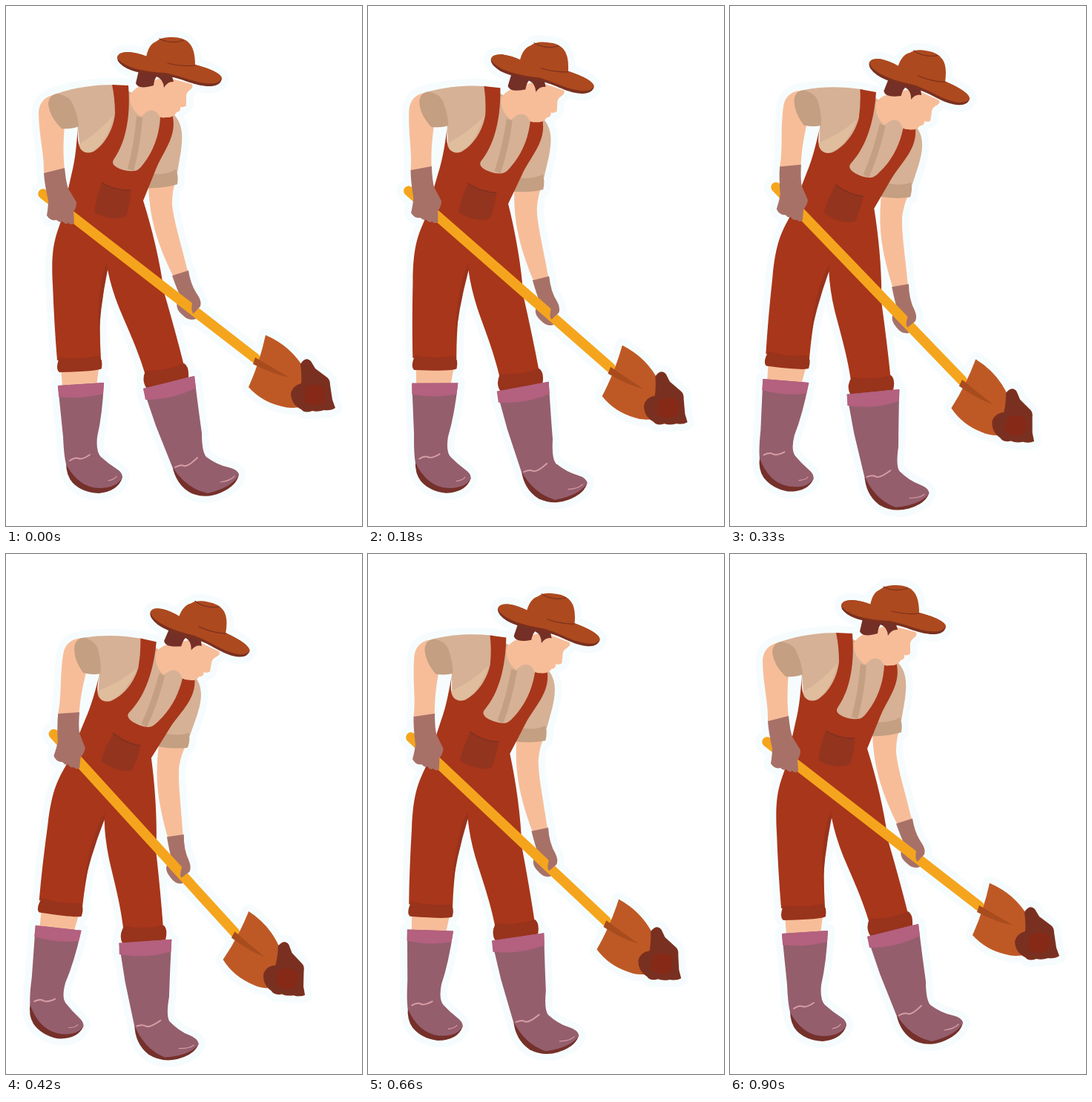
An HTML page that plays this animation: 480x700 px, repeating every 930 ms.

```html
<!DOCTYPE html>
<html lang="en">
<head>
<meta charset="utf-8">
<title>Digging gardener</title>
<style>
  html, body { margin: 0; width: 100%; height: 100%; overflow: hidden; background: #fff; }
  svg { display: block; width: 480px; height: 700px; }
</style>
</head>
<body>
<svg viewBox="0 0 480 700"><g id="man" stroke-linejoin="round" stroke-linecap="round"></g></svg>
<script>
const SKIN = '#f7bd99', SHIRT = '#d6b196', SHADE = '#c49f82', CLOTH = '#a8361a', CUFF = '#98331c',
      GLOVE = '#a77168', BOOT = '#945e6d', BAND = '#b4607f', SOLE = '#75302a', SHINE = '#d79ca4',
      HAT = '#ad491e', DARK = '#7a3020', HALO = '#f6fcfd';

// [colour, path, line width]; shapes without a width are filled
const parts = [
  // right arm and shirt
  [SKIN, 'M192 243C194 285 202 315 225 363L245 357C236 320 225 285 224 266Q224 250 228 238Z'],
  [SHIRT, 'M68 118C95 109 120 106 146 106L168 116L225 145C240 158 238 180 236 195L231 224L192 235L150 230L100 195L97 165C92 140 85 125 68 118Z'],
  ['#dfbd9d', 'M98 186Q125 170 145 147Q135 190 110 199Q100 197 98 186Z'],
  [SHADE, 'M176 148L184 150Q181 190 172 222L164 219Q173 185 176 148Z'],
  [SHADE, 'M196 226Q215 228 229 220Q233 228 231 240Q212 246 189 245Q191 235 196 226Z'],
  // left arm
  [SKIN, 'M62 120C50 124 44 132 44 145C45 180 52 200 51 226L79 221C77 200 77 185 79 160Z'],
  [SHADE, 'M57 131Q58 120 68 118C80 120 88 124 91 135Q97 148 98 162Q88 166 75 165C66 156 58 145 57 131Z'],
  // legs and overalls
  [SKIN, 'M74 488H125L122 512H76Z'],
  [CLOTH, 'M143 106L165 107C168 145 163 182 145 207C142 212 146 216 153 219Q164 223 172 222C180 222 184 214 190 206C202 188 207 168 208 150L224 145C232 175 212 195 202 220Q192 245 185 262C197 300 208 345 213 385Q229 440 240 484L188 497C178 462 160 425 152 405Q142 380 137 355C131 370 133 385 127 410Q126 445 128 475L69 477Q65 430 63 375C60 325 67 310 74 290Q82 255 88 228C94 205 95 185 97 163C96 180 98 190 102 194Q108 200 118 196C134 186 145 165 147 145Q147 125 143 106Z'],
  [CUFF, 'M136 345Q121 385 125 455Q126 410 137 355Z'],
  ['#93341f', 'M129 238Q148 248 168 248Q168 265 162 283Q145 291 119 278Q121 260 126 247Z'],
  [DARK, 'M129 238Q148 249 168 248', 1.2],
  [CUFF, 'M72 473Q98 477 124 471Q131 474 129 488Q124 492 72 493Q66 489 72 473Z'],
  [CUFF, 'M188 491Q215 492 240 481Q247 485 246 500L190 515Q182 505 188 491Z'],
  // boots
  [SOLE, 'M81 615Q81 632 90 642Q103 655 125 656Q152 653 157 634L140 620Z'],
  [BOOT, 'M70 511L132 507Q130 550 123 580Q121 600 128 607Q138 616 149 623Q157 628 157 634Q150 649 125 649Q98 648 81 617Q78 605 77 580Z'],
  [BAND, 'M70 511L132 507L131 522Q100 530 71 526Z'],
  [SHINE, 'M86 612Q93 607 98 609T113 604', 2],
  [SHINE, 'M138 639Q147 637 149 633', 1.2],
  [SOLE, 'M224 618Q229 645 250 656Q270 664 290 655Q312 645 314 630L290 620Z'],
  [BOOT, 'M185 515L254 498Q259 540 264 575Q264 600 270 607Q285 618 300 621Q313 624 314 631Q305 648 272 656Q243 650 224 620Q210 585 202 565Z'],
  [BAND, 'M185 515L254 498L256 514Q225 530 188 530Z'],
  [SHINE, 'M228 621Q235 617 240 619T258 608', 2],
  [SHINE, 'M289 641Q303 639 308 633', 1.2],
  // head and hat
  [SKIN, 'M180 108L213 95L250 105Q254 108 248 113Q242 117 243 124L243 134Q240 137 235 136Q236 142 230 143Q226 151 215 150Q208 152 204 144Q198 138 190 142L182 149Q166 138 167 120Q172 112 180 108Z'],
  ['#742f26', 'M179 87L175 104Q178 113 199 107Q200 98 203 95Q212 98 213 110Q218 101 226 102L224 95Z'],
  [DARK, 'M150 70Q151 62 165 62Q178 63 190 68L255 79Q289 88 291 98Q289 109 270 108C250 106 240 98 215 94Q180 92 163 84Q150 77 150 70Z'],
  [HAT, 'M150 69Q151 62 165 62Q178 63 190 68L255 79Q289 88 291 97Q287 106 270 104C250 102 240 95 215 90Q180 88 163 80Q152 75 150 69Z'],
  [HAT, 'M189 69Q192 52 202 48Q210 41 224 42Q240 42 247 50Q255 58 255 80Q220 85 189 69Z'],
  [DARK, 'M207 44Q222 52 240 46M218 77Q237 82 255 80', 1.2],
  // hands and shovel
  [GLOVE, 'M224 363L246 356Q249 376 259 390Q264 398 262 404Q254 413 256 421Q247 425 238 416Q228 408 231 399L236 393Q230 380 224 363Z'],
  ['#f5a51d', 'M50 253L336 474', 13.5],
  ['#be5926', 'M350 443Q385 458 403 490L400 539Q385 543 372 539Q345 533 327 513Q342 480 350 443Z'],
  ['#a84c1e', 'M336 473L382 500Q360 496 333 482Z'],
  [DARK, 'M397 482Q404 471 411 478L417 488L433 500Q437 503 437 510L440 530L444 541Q438 545 429 544Q420 547 413 545Q403 549 398 543Q385 537 384 522Q386 511 398 508Q399 497 397 482Z'],
  ['#862a17', 'M404 513Q420 506 430 514Q433 530 425 536Q412 540 402 532Z'],
  [GLOVE, 'M243 386L254 384Q262 395 262 404L253 414Q249 412 251 400Z'],
  [GLOVE, 'M51 225L79 218Q81 238 84 246L95 264Q95 272 91 277L92 292Q88 296 84 292Q80 295 76 290Q72 292 68 288Q60 290 55 282Q57 270 57 262Q52 240 51 225Z'],
];

const man = document.getElementById('man');

function addPath(d, fill, stroke, width) {
  const path = document.createElementNS('http://www.w3.org/2000/svg', 'path');
  const attrs = { d, fill, stroke, 'stroke-width': width };
  for (const name in attrs) path.setAttribute(name, attrs[name]);
  man.append(path);
}

for (const [, d, width = 0] of parts) addPath(d, width ? 'none' : HALO, HALO, width + 19);
for (const [color, d, width] of parts) addPath(d, width ? 'none' : color, width ? color : 'none', width || 0);

// The figure rocks about the hip in 30 ms steps
function draw() {
  const step = Math.floor(performance.now() / 30) % 31;
  const angle = 5 * (1 - Math.cos(step / 30 * 2 * Math.PI));
  man.setAttribute('transform', `rotate(${angle} 118.5 331)`);
  requestAnimationFrame(draw);
}
draw();
</script>
</body>
</html>
```
